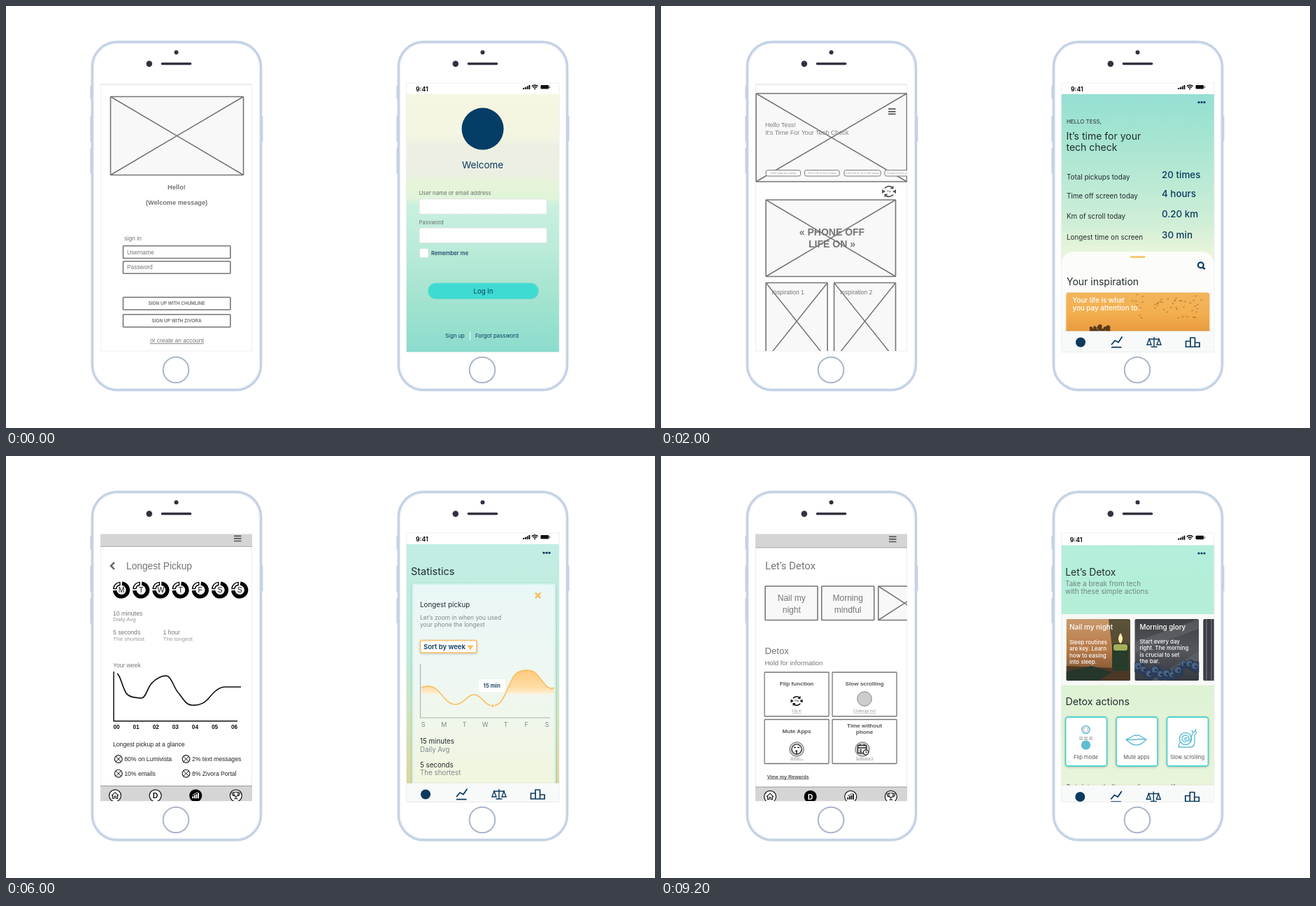
Recreate the animation shown at these times as an HTML page. Size 928x603 px, loop 10000 ms.

```html
<!DOCTYPE html>
<html lang="en">
<head>
<meta charset="utf-8">
<title>Wireframe to design</title>
<style>
  html, body { margin: 0; width: 100%; height: 100%; overflow: hidden; background: #fff; }
  svg { display: block; width: 928px; height: 603px; }
  .left { font-family: "Liberation Sans", Arial, sans-serif; }
  .right, .geo { font-family: Inter, sans-serif; }
  .rob { font-family: Roboto, sans-serif; }
  .light { font-weight: 300; }
  .med { font-weight: 500; }
  .semi { font-weight: 600; }
  .bold { font-weight: 700; }
  .mid { text-anchor: middle; }
  .end { text-anchor: end; }
  .under { text-decoration: underline; }
  .shadow { filter: drop-shadow(0 1px 1.5px #0003); }
</style>
</head>
<body>
<svg id="stage" viewBox="0 0 928 603"></svg>
<script>
const NAVY = '#0b3a5e', GREY = '#757575', INK = '#222b2e', SOFT = '#7d8a8c', ORANGE = '#fbbf61', TEAL = '#5fbdd3';

// Drawing helpers; each returns SVG markup.
const text = (x, y, size, str, fill = GREY, cls = '') =>
  `<text x="${x}" y="${y}" font-size="${size}" fill="${fill}" class="${cls}">${str}</text>`;
const lines = (x, y, size, lead, rows, fill, cls) =>
  rows.map((row, i) => text(x, y + i * lead, size, row, fill, cls)).join('');
const rect = (x, y, w, h, fill, more = '') =>
  `<rect x="${x}" y="${y}" width="${w}" height="${h}" fill="${fill}" ${more}/>`;
const circle = (x, y, r, fill, more = '') =>
  `<circle cx="${x}" cy="${y}" r="${r}" fill="${fill}" ${more}/>`;
const path = (d, stroke, width = 1.5, fill = 'none', more = '') =>
  `<path d="${d}" stroke="${stroke}" stroke-width="${width}" fill="${fill}" ${more}/>`;
const at = (x, y, body, more = '') => `<g transform="translate(${x} ${y}) ${more}">${body}</g>`;
const box = (x, y, w, h, fill = '#fff', width = 1.6) =>
  rect(x, y, w, h, fill, `stroke="${GREY}" stroke-width="${width}" rx=".8"`);
const crossBox = (x, y, w, h) =>
  box(x, y, w, h, '#f8f8f8') + path(`M${x} ${y}l${w} ${h}M${x} ${y + h}l${w} ${-h}`, GREY);
const gradient = (id, y1, y2, stops) =>
  `<linearGradient id="${id}" gradientUnits="userSpaceOnUse" x1="0" x2="0" y1="${y1}" y2="${y2}">` +
  stops.map(([p, c]) => `<stop offset="${p}" stop-color="${c}"/>`).join('') + '</linearGradient>';
const clip = (id, shape) => `<clipPath id="${id}">${shape}</clipPath>`;

let seed = 7;
const rand = () => (seed = seed * 16807 % 2147483647) / 2147483647;

const phone = x => at(x, 0,
  path('M121.5 114v19M121.5 157v37M121.5 203v36M366.3 157v36', '#c3d0e2', 2.2) +
  rect(123.2, 51.2, 241.4, 497.6, '#fff', 'rx="36" stroke="#c4d2e4" stroke-width="3.4"') +
  rect(125.6, 53.6, 236.6, 492.8, 'none', 'rx="34" stroke="#e9f0f7"') +
  circle(243.5, 66.3, 3, '#30323f') + circle(204.8, 82.6, 4.3, '#30323f') +
  path('M223.5 82.5h40', '#30323f', 3.6, 'none', 'stroke-linecap="round"') +
  circle(243, 520, 18.3, '#fff', 'stroke="#a9b6cc" stroke-width="2"'));

// Wireframe parts
const burger = (x, y) => path(`M${x} ${y}h10.5m-10.5 3.6h10.5m-10.5 3.6h10.5`, '#555', 1.7);
const header = (bottom, y) => rect(135, 112, 217, bottom - 112, '#d5d5d5') +
  path(`M135 ${bottom}h217`, '#a5a5a5', 1) + burger(326, y);
const donut = (x, y, scale = '') => at(x, y,
  path('M22.3 1.5A22.3 22.3 0 1 1-2 -22.3', '#000', 13) +
  path('M5 -26.5A24 24 0 0 1 27 -4.5L17.5 -4.5A14 14 0 0 0 5 -16.5Z', '#000', 3.4, '#fff', 'stroke-linejoin="round"'), scale);
const flip = (x, y, c, s = 1) => at(x, y,
  path('M-6 -4.5A7.5 7.5 0 0 1 5 -5.5M6 4.5A7.5 7.5 0 0 1-5 5.5', c, 1.8) +
  path('M6.5 -8.5v5h-5zM-6.5 8.5v-5h5zM-10 -3l5 3-5 3zM10 -3l-5 3 5 3z', 'none', 0, c) +
  text(0, 1.3, 4, 'Flip', c, 'mid'), `scale(${s})`);
const marks = [
  c => path('M-5 0L0 -4.6 5 0M-3.5 -1v5h2.3v-3h2.4v3h2.3v-5', c, 1.1),
  c => text(0, 3.8, 10.5, 'D', c, 'bold mid'),
  c => path('M-4 4v-3M-1.4 4v-5M1.2 4v-6M3.8 4v-8', c, 1.8) + path('M-4.5 -1L3 -5', c, .8),
  c => path('M-3 -5h6v3q0 3-3 3t-3-3zM-3 -4h-2.5q0 4 3 4M3 -4h2.5q0 4-3 4M0 1v3M-2.5 4.5h5', c, 1.1)
];
const tabs = (top, active) => rect(135, top, 217, 24, '#d5d5d5') + path(`M135 ${top}h217`, '#999', 1) +
  marks.map((mark, i) => at(156 + i * 57.6, top + 13.8,
    circle(0, 0, 8.5, i == active ? '#000' : '#fff', 'stroke="#111" stroke-width="1.2"') +
    mark(i == active ? '#fff' : '#111'))).join('');

const chip = (x, w, str) => rect(x, 234.6, w, 8.4, '#fff', `rx="2.5" stroke="${GREY}"`) +
  text(x + w / 2, 240.3, 4.3, str, '#999', 'mid');
const tile = (x, y, name, value) => crossBox(x, y, 89.3, 84.3) +
  lines(x + 44.8, y + 16.3, 10.5, 10.5, name, GREY, 'geo light mid') +
  text(x + 41.5, y + 76, 17, value, GREY, 'geo light mid');
const glance = (x, y, str) => circle(x, y, 5.4, '#fff', 'stroke="#111" stroke-width="1.1"') +
  path(`M${x - 3.8} ${y - 3.8}l7.6 7.6m0 -7.6l-7.6 7.6`, '#111', 1) + text(x + 8.5, y + 3.2, 8.6, str, '#222');
const action = (x, y, name, note, icon) => box(x, y, 92, 63, '#fff', 1.3) +
  lines(x + 46, y + (name[1] ? 11.5 : 19), 8.1, 8.6, name, '#555', 'bold mid') + icon +
  text(x + 46, y + 57, 5, note, '#999', 'under mid');

const wireframes = [
  crossBox(149.5, 129.5, 190, 112) +
  text(244, 262.3, 9.3, 'Hello!', GREY, 'bold mid') +
  text(244, 283.6, 9.2, '(Welcome message)', GREY, 'bold mid') +
  text(169, 334.7, 8.6, 'sign in') +
  box(167.5, 342.7, 153.3, 17.8) + text(173, 354.5, 8.4, 'Username') +
  box(167.5, 364.7, 153.3, 17.6) + text(173, 376.3, 8.4, 'Password') +
  box(167.5, 416.2, 153.3, 17.8) + text(244, 427.4, 6.5, 'SIGN UP WITH CHUMLINE', GREY, 'bold mid') +
  box(167.5, 440.8, 153.3, 18) + text(244, 452.2, 6.5, 'SIGN UP WITH ZIVORA', GREY, 'bold mid') +
  text(244.4, 481, 8.45, 'or create an account', GREY, 'under mid'),

  crossBox(136, 125, 215.5, 126) + burger(325, 147.2) +
  lines(149, 173.3, 9, 11, ['Hello Tess!', 'It’s Time For Your Tech Check'], '#808080') +
  chip(150, 49.5, 'Total pickups today') + chip(205.5, 49.5, 'Time off screen today') +
  chip(262, 52, 'Kilometres of scroll today') + chip(320, 50, 'Longest time on screen') +
  flip(326, 265, '#555') +
  crossBox(150, 277, 185.5, 109.5) +
  lines(244.5, 328.3, 14, 16.6, ['« PHONE OFF', 'LIFE ON »'], GREY, 'bold mid') +
  crossBox(150, 395.5, 88, 110) + text(158.5, 412, 8.5, 'Inspiration 1') +
  crossBox(247.5, 395.5, 88, 110) + text(256, 412, 8.5, 'Inspiration 2'),

  header(135, 119.6) + donut(172.5, 176.5) +
  text(215, 161.6, 15.2, 'Congrats Tess!') + text(215, 179, 8.1, 'You can check you stats here') +
  tile(145, 240.5, ['Last Pickup'], '20h38') + tile(145, 334, ['Best Detox'], '1h38') +
  tile(145, 427, ['Checking', 'every'], '5 min') +
  tile(248, 257, ['Pickups'], '40 times') + tile(248, 350.3, ['Longest scroll'], '40 Km') +
  tile(248, 443.3, ['Longest', 'Pickup'], '1h20'),

  header(129.3, 114.3) + path('M155 152l-5 4.9 5 4.9', '#666', 2.5) +
  text(172, 162, 13.75, 'Longest Pickup') +
  [...'MTWTFSS'].map((day, i) => donut(165 + i * 28.2, 191.5, 'scale(-.42 .42)') +
    text(165 + i * 28.2, 195.4, 10.5, day, '#111', 'mid')).join('') +
  text(153, 227.7, 8.6, '10 minutes') + text(153, 235.8, 7.9, 'Daily Avg', '#999') +
  text(153, 255.3, 8.6, '5 seconds') + text(153, 263.6, 8.1, 'The shortest', '#999') +
  text(224.5, 255.3, 8.6, '1 hour') + text(224.5, 263.6, 8.1, 'The longest', '#999') +
  text(153, 301.7, 8.5, 'Your week') +
  path('M154 308V378.7H331', '#111') +
  path('M159 311C164 314 166 330 172 339C177 346 187 345 194 346C200 345 202 332 208 325C214 318 224 313 231 314.5C238 318 240 332 247 339C254 348 258 356 266 356C278 357 285 352 290 346C297 337 304 330 313 330H336', '#111', 1.7) +
  [0, 1, 2, 3, 4, 5, 6].map(i => text(158 + i * 28.1, 389.6, 8.2, '0' + i, '#111', 'bold mid')).join('') +
  text(153, 415, 8.65, 'Longest pickup at a glance', '#222') +
  glance(160.8, 433, '80% on Lumivista') + glance(257.5, 433, '2% text messages') +
  glance(160.8, 453.7, '10% emails') + glance(257.5, 453.7, '8% Zivora Portal') + tabs(471.5, 2),

  header(131, 115.3) + text(149, 161.5, 14.8, 'Let’s Detox', GREY, 'rob') +
  box(149, 186, 75, 48.5, '#f8f8f8') + lines(186.8, 206.7, 12, 17, ['Nail my', 'night'], GREY, 'mid') +
  box(229.7, 186, 75, 48.5, '#f8f8f8') + lines(267.2, 206.7, 12, 17, ['Morning', 'mindful'], GREY, 'mid') +
  crossBox(310.7, 186, 75, 48.5) +
  text(148.5, 282.7, 13.1, 'Detox') + text(148.5, 298.8, 9.5, 'Hold for information') +
  action(148, 309, ['Flip function'], 'Flip it!', flip(194, 350, '#111', .85)) +
  action(245, 309, ['Slow scrolling'], 'Challenge me!', circle(291, 347, 10.3, '#ccc', 'stroke="#888"')) +
  action(148, 376.5, ['Mute Apps'], 'Shhhh...', circle(194, 419, 10.3, '#ccc', 'stroke="#777"') +
    circle(194, 419, 7, '#fff', 'stroke="#222" stroke-width="1.2"') +
    path('M190 416.5h3M195 416.5h3M192 421.5h3M194 420.5v6', '#222', 1.5)) +
  action(245, 376.5, ['Time without', 'phone'], 'Schedule it', circle(288, 419, 10.3, '#ccc', 'stroke="#777"') +
    rect(281.5, 413.5, 12, 11, '#fff', 'stroke="#222" stroke-width="1.4"') +
    path('M281.5 417h12M284.5 411.5v3M290.5 411.5v3M284 420h3M284 422.5h3', '#222', 1.4) +
    circle(293, 423.5, 3.6, '#fff', 'stroke="#222" stroke-width="1.2"') + path('M293 421.5v2h1.7', '#222', 1)) +
  text(151.7, 460.5, 7.1, 'View my Rewards', '#555', 'bold under') + tabs(473, 1)
];

// Design parts
const status = (dx = 0, dy = 0) => rect(572, 110, 219, 16 + dy, '#fff') + at(dx, dy,
  text(586, 122, 8.6, '9:41', '#111', 'bold')) + at(0, dy / 2,
  path('M740 119v-2M742.8 119v-3M745.6 119v-4.4M748.4 119v-6', '#111', 2) +
  path('M751.8 114.6q4.4 -3.4 8.8 0M753.5 116.6q2.7 -2 5.4 0', '#111', 1.5) + circle(756.2, 118.3, 1.1, '#111') +
  rect(764.5, 113, 11.5, 5.6, '#111', 'rx="1.3"') + path('M777.3 114.6v2.4', '#111', 1));
const dots = y => [769, 773, 777].map(x => circle(x, y, 1.6, NAVY)).join('');
const nav = (top, y, dx = 0) => rect(572, top, 219, 495 - top, '#f8fafa', 'class="shadow"') + at(dx, y,
  circle(600, 0, 7, NAVY) +
  path('M644 3.5l5 -6 5 2.5 5.5 -8M644 7.2h14.5', NAVY, 1.8) +
  path('M697 -4.5h16M705 -7.5V6.5M700.5 6.5h9M698 -4.5l-3 8h6zM712 -4.5l-3 8h6z', NAVY, 1.4) +
  path('M750.5 6.5v-8h6.5v8zM757 6.5v-13h6.5v13zM763.5 6.5v-6h6.5v6z', NAVY, 1.7));
const sky = i => rect(572, 126, 219, 369, `url(#sky${i})`);
const field = y => rect(591, y, 182.3, 21.5, '#fff', 'rx="2.5" stroke="#dbe3df"');
const record = (y, name, value) => text(580, y, 9.85, name, INK) + text(716, y - 2, 13.4, value, NAVY, 'med');
const small = str => `<tspan font-size="10">${str}</tspan>`;
const stat = (x, y, name, value) => rect(x, y, 91 + (x > 600 ? 2 : 0), 75.5, '#fff',
  'rx="1.5" stroke="#c8f1ee" stroke-width="2" class="shadow"') +
  lines(x + (x > 600 ? 7 : 6), y + 15.6, 9.9, 11, name, INK) + text(x + (x > 600 ? 86 : 85), y + 67.7, 13.4, value, NAVY, 'med end');
const mode = (x, name, icon) => rect(x, 373, 59, 70, '#fff',
  'rx="3.5" stroke="#52d2d0" stroke-width="1.8" class="shadow"') + icon + text(x + 29, 433, 7.5, name, '#555', 'mid');
const wave = 'M594 331C600 328 608 328 614 332C624 340 630 355 643 355C655 355 660 340 670 341C681 342 684 357 696 357C712 357 716 330 726 315C732 305 752 302 760 313C768 322 774 336 784 331';

const birds = () => Array.from({ length: 46 }, () => {
  const u = rand(), x = 672 + u * 100, y = 412 + rand() * 36;
  return path(`M${x} ${y}l1.3 .9 1.3 -1.1`, '#8c5a26', .8);
}).join('');
const tree = () => Array.from({ length: 30 }, () =>
  circle(614 + rand() * 28, 458 + rand() * 7, 1 + rand() * 2.2, '#5b3a17')).join('');
const berries = () => Array.from({ length: 11 }, (_, i) => {
  const x = 683 + i * 8.2, y = 302 + rand() * 15 - (i > 7 ? 14 : 0), r = 6 + rand() * 3;
  return circle(x, y, r, '#2b3c57') + circle(x - 1.5, y - 2, r * .55, '#4a6283') + circle(x, y - 1, 1.6, '#1d2a40');
}).join('');

const candle = rect(579.5, 233, 91.5, 88, 'url(#dusk)') +
  path('M640 233h31v88h-20z', 'none', 0, '#2d3526', 'opacity=".7"') +
  path('M579.5 300L671 304V321H579.5z', 'none', 0, '#4b3826') +
  path('M579.5 308l36 -8 30 9-20 12h-46z', 'none', 0, '#26362b') +
  rect(645, 268, 24, 39, '#273c2b', 'rx="3"') + rect(647, 269, 20, 9, '#a5ae5c', 'rx="3"') +
  path('M657 253q6 9 0 15q-6 -6 0 -15', 'none', 0, '#fff0b0');
const bowl = rect(677.3, 233, 92, 88, 'url(#slate)') +
  path('M677 266l92 -33v14l-92 34zM700 321l69 -42v13l-48 29z', 'none', 0, '#6a6e72', 'opacity=".5"') + berries();

const designs = [
  sky(0) + status() + circle(681.6, 175.6, 30, '#053d66') +
  text(681.6, 232.3, 13.5, 'Welcome', NAVY, 'mid') +
  text(590.5, 270, 7.8, 'User name or email address', '#66716f') + field(275.8) +
  text(590.5, 311.5, 7.6, 'Password', '#66716f') + field(317) +
  rect(591.5, 346.7, 12.5, 12.5, '#fff', 'rx="2" stroke="#dbe8e2"') +
  text(608, 356, 7.7, 'Remember me', NAVY, 'med') +
  rect(603.5, 396, 158, 22.5, '#3edbd3', 'rx="11.2" stroke="#6fd8cc"') + text(682.5, 411, 9.6, 'Log in', NAVY, 'mid') +
  text(628, 474, 7.8, 'Sign up', NAVY) + path('M663.5 466v11.5', '#fff', 1) + text(671, 474, 7.8, 'Forgot password', NAVY),

  sky(1) + status() + dots(137.6) + text(580, 167.5, 7.9, 'HELLO TESS,', INK) +
  lines(579.5, 190.8, 14, 16, ['It’s time for your', 'tech check'], INK) +
  record(247.7, 'Total pickups today', '20 times') + record(274.5, 'Time off screen today', '4 hours') +
  record(304.3, 'Km of scroll today', '0.20 km') + record(334, 'Longest time on screen', '30 min') +
  path('M572 495V372Q572 351 594 351H769Q791 351 791 372V495Z', 'none', 0, '#fcfdfa') +
  rect(671, 357.3, 21.5, 2.8, '#f8c66c', 'rx="1"') +
  circle(771.8, 370.3, 3.9, 'none', `stroke="${NAVY}" stroke-width="2.2"`) + path('M774 373l3.8 3', NAVY, 2.4) +
  text(580, 399.2, 14, 'Your inspiration', INK) +
  rect(579.5, 409.5, 204.7, 80, 'url(#sunset)', 'rx="3" class="shadow"') + birds() + tree() +
  lines(588.5, 423.6, 9.8, 11.4, ['Your life is what', 'you pay attention to.'], '#fff', 'med') + nav(464.5, 480.5),

  sky(2) + status() + dots(138) + text(578.7, 170, 14.5, 'Statistics', INK) +
  text(579.5, 185, 10, 'All your statistics summary', SOFT) +
  stat(582, 210.5, ['Longest', 'pickup'], `1${small('h')} 20${small('min')}`) + stat(690, 210.5, ['Longest', 'scroll'], `20${small('Km')}`) +
  stat(582, 304.5, ['Total', 'pickups'], `40 ${small('times')}`) + stat(690, 304.5, ['Total', 'scroll'], `345${small('Km')}`) +
  stat(582, 398.8, ['Checking', 'every'], `5 ${small('min')}`) + stat(690, 398.8, ['Total', 'offscreen'], `1${small('h')} 38${small('min')}`) +
  nav(467.5, 483.5),

  sky(3) + status() + dots(138.3) + text(579, 170.3, 14.5, 'Statistics', INK) +
  rect(581.5, 183, 203.5, 300, 'url(#card)', 'rx="2" stroke="#d3f3f0" stroke-width="2" class="shadow"') +
  path('M757 195.5l7.5 7.5m0 -7.5l-7.5 7.5', ORANGE, 2.6) +
  text(592, 216.2, 9.8, 'Longest pickup', INK) +
  lines(592, 233.6, 8.5, 9.9, ['Let’s zoom in when you used', 'your phone the longest'], SOFT) +
  rect(592.5, 263.5, 80.5, 17.5, '#fff', `rx="2.5" stroke="${ORANGE}" stroke-width="1.5" class="shadow"`) +
  text(597, 276, 9.5, 'Sort by week', NAVY, 'semi') + path('M659.5 270.5h9l-4.5 7z', 'none', 0, ORANGE) +
  path(wave + 'V400H594Z', 'none', 0, 'url(#glow)', 'clip-path="url(#above)"') +
  path('M592.5 297V374H778', '#a8b3b8', 1.2) + path(wave, ORANGE, 1.6) +
  circle(696, 357, 2.5, ORANGE, 'stroke="#fff"') +
  rect(676, 319, 38, 18, '#fff', 'rx="1.5" opacity=".95"') + text(694.7, 331, 7.9, '15 min', NAVY, 'semi mid') +
  [...'SMTWTFS'].map((day, i) => text(596.7 + i * 29.5, 387.4, 9, day, SOFT, 'mid')).join('') +
  text(592, 411, 9.75, '15 minutes', INK) + text(592, 422.5, 9.7, 'Daily Avg', SOFT) +
  text(592, 444.5, 9.75, '5 seconds', INK) + text(592, 456, 9.8, 'The shortest', SOFT) + nav(467.5, 483.5),

  sky(4) + status(-1.3, 1.4) + dots(139) + text(578.3, 171, 13.8, 'Let’s Detox', INK) +
  lines(578, 186, 9.95, 11, ['Take a break from tech', 'with these simple actions'], '#6f8581') +
  rect(572, 226, 219, 101.5, '#f8f9f7') +
  `<g clip-path="url(#photos)">${candle}${bowl}</g>` +
  rect(775.3, 233, 20, 88, '#3b3d42', 'rx="2"') + path('M780 233v88M787 233v88', '#5b5e64', 2) +
  text(584, 248, 10, 'Nail my night', '#fff', 'med') +
  lines(584, 268.7, 7.9, 9.4, ['Sleep routines', 'are key. Learn', 'how to easing', 'into sleep.'], '#fff', 'med') +
  text(684.5, 248, 9.8, 'Morning glory', '#fff', 'med') +
  lines(684.5, 267.7, 7.9, 9.4, ['Start every day', 'right. The morning', 'is crucial to set', 'the bar.'], '#fff', 'med') +
  text(578.5, 356.3, 14.2, 'Detox actions', INK) +
  mode(578.5, 'Flip mode', circle(607.5, 391, 5.5, '#fff', `stroke="${TEAL}" stroke-width="1.6"`) +
    circle(607.5, 391, 3.2, 'none', `stroke="#aaa" stroke-width=".8"`) +
    path('M598 402h20M598 404.7h20', '#888', 1, 'none', 'stroke-dasharray="5 2"') + circle(607.5, 413, 6.7, TEAL)) +
  mode(651, 'Mute apps', path('M665 405Q671 403 675 400Q679 398 680 400Q682 398 685 400Q689 403 694 405Q687 413 680 413Q672 413 665 405ZM665 405Q673 406 680 405T694 405', TEAL, 1.3)) +
  mode(723.5, 'Slow scrolling', circle(750, 404, 8.6, 'none', `stroke="${TEAL}" stroke-width="1.5"`) +
    path('M750 409a5 5 0 1 1 5 -5a3 3 0 1 1-6 0a1.5 1.5 0 0 1 3 0M742 409q-2 4-2 7H757q6 0 6 -8V399q4 -4 1 -6l-4 3q-2 7-4 13M761 396l-2 -4M764 393l1 -3', TEAL, 1.4)) +
  text(578.5, 477, 10, 'Get detox challenges for yourself', '#4d5a58') + nav(470.5, 487, -.7)
];

const skies = [
  [[0, '#f6f7e2'], [.17, '#f3f5e2'], [.2, '#edefe3'], [.31, '#ebefe2'], [.35, '#e6f5d9'], [.405, '#e0f4d8'], [.43, '#c9f0df'], [.6, '#bbebd9'], [.75, '#a9e5d1'], [1, '#8bdccd']],
  [[0, '#95dfd3'], [.15, '#a3e4d1'], [.35, '#bbead5'], [.5, '#d0eed7'], [.62, '#eaf5da'], [1, '#f1f7df']],
  [[0, '#bfeee6'], [.45, '#bcebd9'], [.65, '#c6e8c9'], [.93, '#dfe0a8'], [1, '#dfe0a8']],
  [[0, '#c2ede5'], [.45, '#bdebd9'], [.65, '#cfe4be'], [.93, '#dcd79d'], [1, '#dcd79d']],
  [[0, '#b3efdc'], [.27, '#b5eed6'], [.55, '#def2d4'], [1, '#ebf5dc']]
];

const defs = skies.map((stops, i) => gradient('sky' + i, 126, 494, stops)).join('') +
  gradient('sunset', 409, 465, [[0, '#f2b55c'], [.5, '#f4b04f'], [1, '#e99a3f']]) +
  gradient('card', 183, 467, [[0, '#e9f7f7'], [.5, '#eff7f2'], [1, '#f1f6de']]) +
  gradient('glow', 306, 341, [[0, '#ffcb7c'], [.7, '#ffdca6'], [1, '#fff3df']]) +
  gradient('dusk', 233, 321, [[0, '#c8996a'], [.5, '#b77a48'], [1, '#6d4a2d']]) +
  gradient('slate', 233, 321, [[0, '#3d4043'], [.5, '#53575b'], [1, '#34383f']]) +
  clip('wire', rect(135, 111.5, 217, 381.5)) + clip('app', rect(572.5, 110, 218.5, 384.5)) +
  clip('above', rect(590, 290, 200, 50.5)) +
  clip('photos', rect(579.5, 233, 91.5, 88, '#000', 'rx="2.5"') + rect(677.3, 233, 92, 88, '#000', 'rx="2.5"'));

const frame = rect(135.5, 112, 216, 381, '#fff', 'stroke="#eee"') + path('M135 112h217', '#dedede', 1);
const stage = document.getElementById('stage');
stage.innerHTML = `<defs>${defs}</defs>` + phone(0) + phone(438) + frame +
  wireframes.map((wire, i) => `<g class="scene">
    <g class="left" clip-path="url(#wire)">${wire}</g>
    <g class="right" clip-path="url(#app)">${designs[i]}</g></g>`).join('') +
  rect(572.5, 110, 218.5, 384.5, 'none', 'stroke="#e6eaea" stroke-width=".7"');

const scenes = [...stage.querySelectorAll('.scene')];
function draw() {
  const current = Math.floor(performance.now() % 10000 / 2000);
  scenes.forEach((scene, i) => scene.style.display = i == current ? '' : 'none');
  requestAnimationFrame(draw);
}
draw();
</script>
</body>
</html>
```
